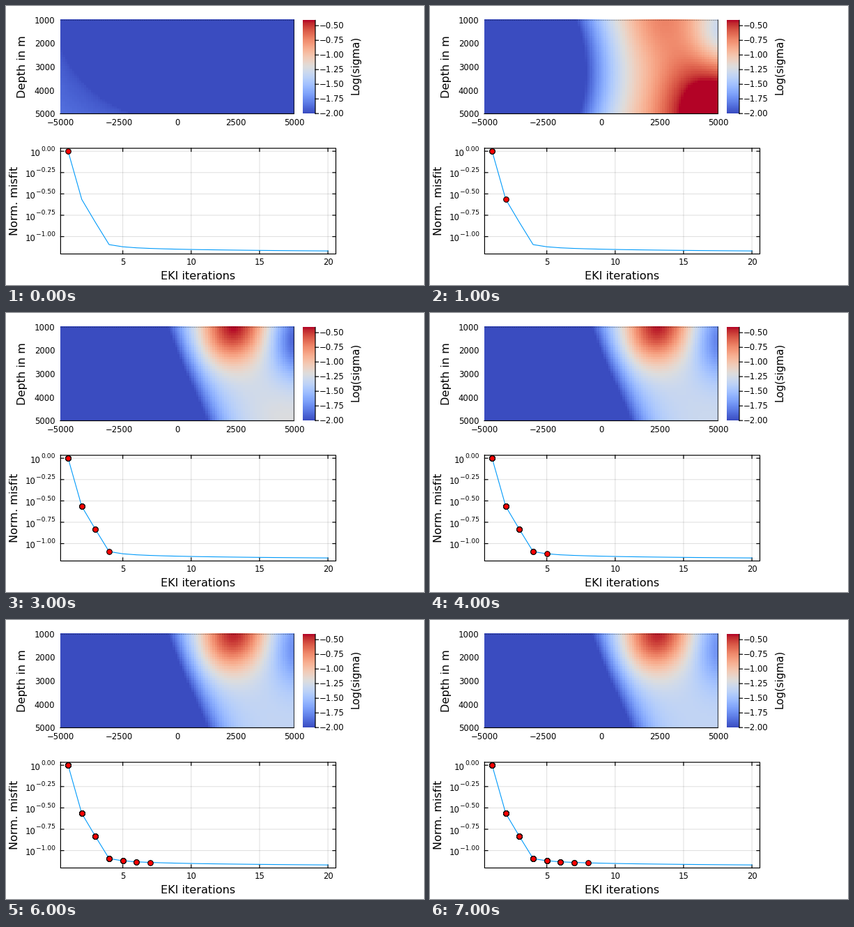
A matplotlib script that plays this animation: 600x400 px, repeating every 8 s.

```python
import numpy as np
import matplotlib.pyplot as plt
from matplotlib.animation import FuncAnimation

W, H, DPI = 600, 400, 100
PX = 72 / DPI
TICK, GUIDE, EXPO = 11.64 * PX, 16.1 * PX, 9.2 * PX
NX, NY = 100, 40
FRAMES = 8

plt.rcParams["font.family"] = "DejaVu Sans"

# Edge polynomial in depth (3), ramp height and width, then the strengths
# of the shallow blob, the resistive sink and the deep conductor.
FIRST = np.array([-1.10, .40, -.09, .72, 2.2, .12, .36, .48])
SECOND = np.array([-.75, .72, -.18, .56, 1.6, .28, .40, .32])
THIRD = np.array([-.40, .42, .00, .41, 1.1, .59, .40, .09])
SETTLED = np.array([-.40, .42, .00, .41, 1.1, .57, .27, .00])

# Cell centres: distance and depth below the top, in km
X, D = np.meshgrid(-5 + 10 * (np.arange(NX) + .5) / NX,
                   4 * (np.arange(NY) + .5) / NY)


def bump(x0, wx, d0, wd):
    return np.exp(-((X - x0) / wx)**2 - ((D - d0) / wd)**2)


def field(step):
    """Conductivity scaled so that 0..1 spans the colour range."""
    if step == 0:
        r = ((X + 5) / 3.2)**.7 + ((4 - D) / 3)**.7
        return .09 * np.sqrt(np.clip(1 - r, 0, 1))
    if step < 3:
        p = FIRST if step == 1 else SECOND
    else:
        p = SETTLED + (THIRD - SETTLED) * np.exp(3 - step)
    e0, e1, e2, height, width, blob, sink, deep = p
    edge = e0 + e1 * D + e2 * D**2
    return (height * np.tanh((X - edge) / width)
            + blob * bump(2.4 - .1 * D, 1.41, 0, 1.6)
            - sink * bump(5.2, 1.2, .6, 1.6)
            + deep * bump(4.8, 2.2, 4, 2.47))


fig = plt.figure(figsize=(W / DPI, H / DPI), dpi=DPI, facecolor="white")
ax = fig.add_axes([0, 0, 1, 1])
ax.axis("off")


def line(xs, ys, color="black", width=1.2, **kw):
    ax.plot(xs, ys, color=color, lw=width * PX, snap=False, **kw)


def label(x, y, text, size=TICK, ha="center", angle=0):
    ax.text(x, y, text, fontsize=size, ha=ha, va="baseline",
            rotation=angle, rotation_mode="anchor")


def signed(value, fmt):
    return format(value, fmt).replace("-", "\u2212")


# Section view
L, R, T, B = 78, 413.3, 20, 154.3
image = ax.imshow(field(0), cmap="coolwarm", vmin=0, vmax=1, aspect="auto",
                  extent=(L, R, B, T), interpolation="nearest")
line([L, R], [B + .2, B + .2])
line([R, R], [T, B], width=.8)
line([L, R], [T + .5, T + .5], width=.8, alpha=.6, linestyle=(0, (1, 1)))
for k in range(5):
    label(70.3, 25 + 33.5 * k, str(1000 * (k + 1)), ha="right")
    label(78.2 + 83.8 * k, 170.6, signed(-5000 + 2500 * k, "d"))
label(28.5, 87.5, "Depth in m", GUIDE, angle=90)

# Colour bar
ax.imshow(np.linspace(1, 0, 256)[:, None], cmap="coolwarm", vmin=0, vmax=1,
          aspect="auto", extent=(426, 444, 154, 20.5))
line([444, 444], [20.5, 154.5])
for k in range(7):
    y = 154.2 - 21 * k
    line([444, 448.5], [y, y])
    label(450.2, y + 4.2, signed(-2 + .25 * k, ".2f"), ha="left")
label(506.3, 84.5, "Log(sigma)", 15 * PX, angle=90)

# Misfit curve
L, R, T, B = 78.4, 473.5, 204, 355.5
iters = np.arange(1, 21)
tail = 345.2 + 2.15 * np.log(iters[4:] - 4)
px = 69.5 + 19.63 * iters
py = np.r_[208.2, 277.3, 310.3, 342.1, tail]
for n in range(5, 21, 5):
    x = px[n - 1]
    line([x, x], [T, B], width=1, alpha=.13)
    line([x, x], [B, B - 4.5])
    line([x, x], [T, T + 4.5])
    label(x, 371.2, str(n))
for k in range(5):
    y = 208.2 + 30.6 * k
    line([L, R], [y, y], width=1, alpha=.13)
    line([L, L + 4.5], [y, y])
    line([R, R - 4.5], [y, y])
    power = signed(0 - .25 * k, ".2f")
    label(70.8, y - .6, power, EXPO, ha="right")
    label(42.5 if k else 49.8, y + 6.6, "10", ha="right")
line([L, R, R, L, L], [T, T, B, B, T])
label(275.5, 392, "EKI iterations", GUIDE)
label(16.7, 279.5, "Norm. misfit", GUIDE, angle=90)
line(px, py, "#009afa", 1.1)
dots, = ax.plot([], [], "o", ms=7.6 * PX, mfc="red", mec="black",
                mew=1.1 * PX, zorder=5, snap=False)

ax.set_xlim(0, W)
ax.set_ylim(H, 0)


def draw(step):
    image.set_data(field(step))
    # Each pass redraws all earlier dots, which hardens their rims.
    order = [i for k in range(step + 1) for i in range(k + 1)]
    dots.set_data(px[order], py[order])
    return image, dots


anim = FuncAnimation(fig, draw, frames=FRAMES, interval=1000, repeat=True,
                     repeat_delay=0)
plt.show()
```
